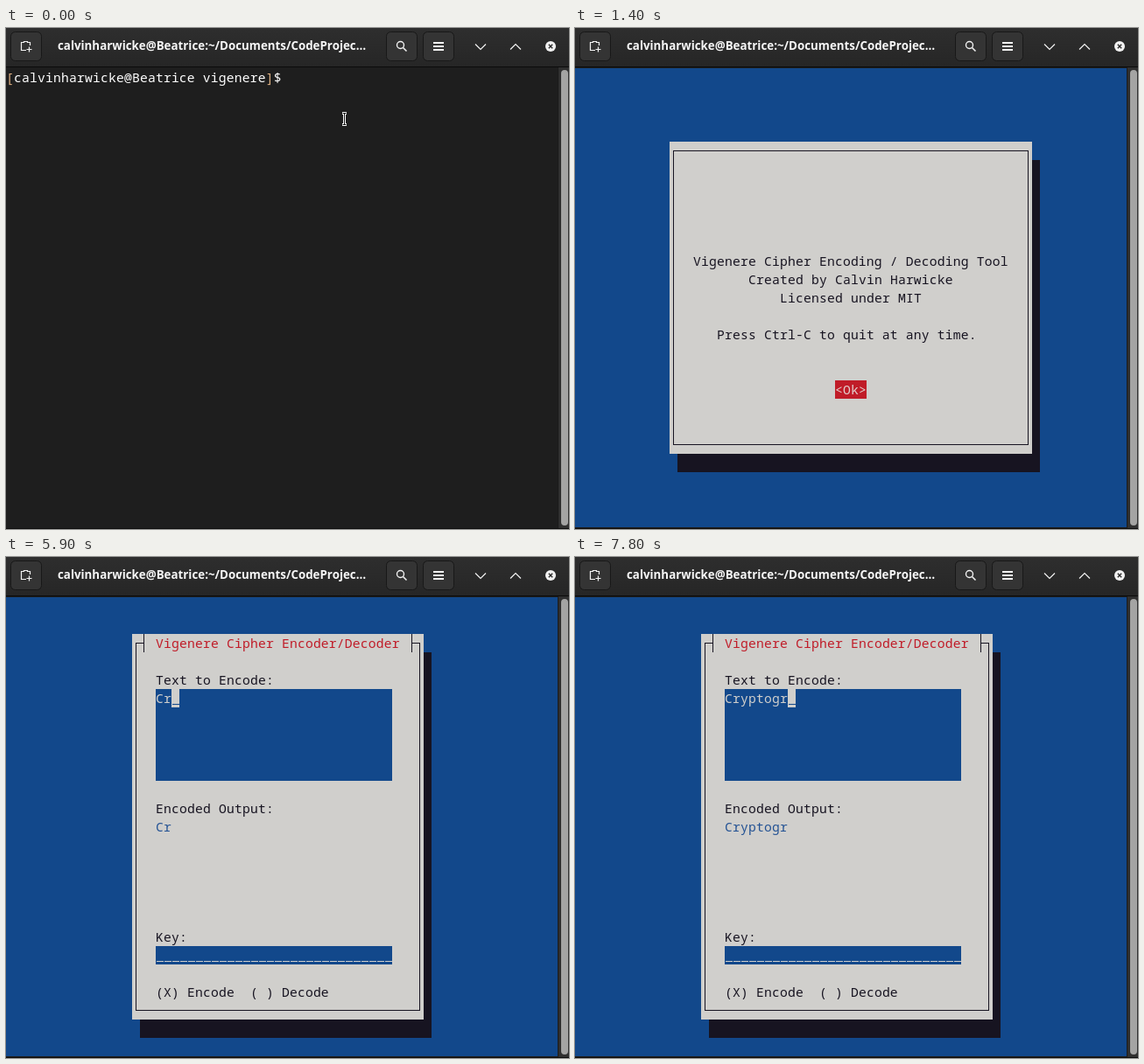
An HTML page for the animation above (8000 ms loop, 643 by 573 pixels).

```html
<!DOCTYPE html>
<html lang="en">
<head>
<meta charset="utf-8">
<title>Vigenere terminal</title>
<style>
  :root {
    --loop: 8s step-end infinite;
    --blue: #12488b;
    --gray: #d0cfcc;
    --ink: #171421;
    --red: #c01c28;
  }
  html, body { margin: 0; width: 100%; height: 100%; overflow: hidden; background: #1e1e1e; }
  .stage { position: relative; width: 643px; height: 573px; overflow: hidden; background: #1e1e1e; }
  .stage * { box-sizing: border-box; }

  .chrome { position: absolute; left: 0; top: 0; }
  .title {
    position: absolute; left: 59px; top: 10px; line-height: 21px; white-space: nowrap;
    font: bold 13.333px/21px "Noto Sans", sans-serif; color: #f6f6f6;
  }

  /* Terminal grid: cells of 9 x 21 pixels */
  .screen {
    position: absolute; left: 0; top: 46px; width: 630px; height: 525px; overflow: hidden;
    font: 14.667px/21px "Noto Sans Mono", monospace; letter-spacing: .2px; color: var(--ink);
  }
  .row, .box, .dialog, .scene { position: absolute; }
  .row, .box { left: calc(var(--c) * 9px); top: calc(var(--r) * 21px); }
  .row { height: 21px; white-space: pre; display: flex; }
  .box { width: calc(var(--w) * 9px); height: calc(var(--h) * 21px); background: var(--fill); }
  .frame { position: absolute; left: 4px; right: 4px; top: 10px; bottom: 10px; border: 1px solid var(--ink); }
  .panel { --fill: var(--gray); box-shadow: 9px 21px var(--ink); }

  .scene { inset: 0; background: var(--blue); }
  .shell { background: #1e1e1e; color: #fff; }
  .shell b { font-weight: normal; color: #dcae80; }
  .intro { animation: intro var(--loop); }
  .tool { animation: tool var(--loop); }
  @keyframes intro { 0% { opacity: 0 } 17.5% { opacity: 1 } 30%, 100% { opacity: 0 } }
  @keyframes tool { 0% { opacity: 0 } 30%, 100% { opacity: 1 } }

  .typed { display: block; overflow: hidden; height: 21px; }
  .cursor { position: relative; flex: none; width: 9px; height: 21px; }

  .command { animation: command var(--loop); }
  .shell .cursor { background: #fff; animation: wake var(--loop); }
  .pointer { position: absolute; left: 380px; top: 46px; animation: hide var(--loop); }
  @keyframes command { 0% { width: 0 } 5% { width: 9px } 11.25%, 100% { width: 81px } }
  @keyframes wake { 0% { opacity: 0 } 3.75%, 100% { opacity: 1 } }
  @keyframes hide { 0% { opacity: 1 } 3.75%, 100% { opacity: 0 } }

  .message { animation: message var(--loop); }
  .input { color: var(--gray); }
  .output { color: #245394; }
  .input .cursor { animation: caret var(--loop); }
  .input .cursor::after {
    content: ""; position: absolute; left: 1px; top: 17px; width: 8px; height: 1px; background: var(--blue);
  }
  @keyframes message {
    0% { width: 0 }
    68.75% { width: 9px }
    73.75% { width: 18px }
    78.75% { width: 27px }
    85% { width: 36px }
    87.5% { width: 45px }
    88.75% { width: 54px }
    96.25% { width: 63px }
    97.5%, 100% { width: 72px }
  }
  @keyframes caret {
    0% { background: linear-gradient(var(--blue) 16px, #b4d3ee 16px) }
    68.75%, 100% { background: var(--gray) }
  }

  .tool .frame { border-top: 0; }
  .tab { position: absolute; top: 0; width: 10px; height: 21px; }
  .tab::before { content: ""; position: absolute; top: 10px; width: 100%; height: 1px; background: var(--ink); }
  .tab.left { left: 4px; border-right: 1px solid var(--ink); }
  .tab.right { right: 4px; border-left: 1px solid var(--ink); }
  .heading { color: var(--red); }
  .ok { background: var(--red); color: #e3cfcc; }
  .blanks {
    position: absolute; left: 0; top: 17px; width: 100%; height: 1px;
    background: repeating-linear-gradient(90deg, transparent 0 1px, var(--gray) 1px 9px);
  }
</style>
</head>
<body>
<div class="stage">
  <svg class="chrome" width="643" height="573" fill="none" stroke="#f2f2f2">
    <defs>
      <linearGradient id="bar" x2="0" y2="1">
        <stop stop-color="#2e2e2e"/><stop offset="1" stop-color="#262626"/>
      </linearGradient>
      <rect id="button" y="4.5" width="35" height="33" rx="5" fill="#343434" stroke="#181818"/>
    </defs>
    <g stroke="none">
      <rect width="643" height="44" fill="url(#bar)"/>
      <rect y="44" width="643" height="1" fill="#0b0b0b"/>
      <rect x="630" y="45" width="13" height="527" fill="#303030"/>
      <rect x="630" y="45" width="1" height="527" fill="#1b1b1b"/>
      <rect x="634" y="48" width="8" height="521" rx="4" fill="#a4a4a3"/>
      <rect y="572" width="643" height="1" fill="#0d0d0d"/>
    </g>
    <use href="#button" x="5.5"/>
    <use href="#button" x="434.5"/>
    <use href="#button" x="476.5"/>
    <path d="M23 25.5H17.5V16.5H20.5V15.5H24.5V16.5H27.5V20M26.5 21.5V27.5M23.5 24.5H29.5" stroke-width="1.2"/>
    <circle cx="450.5" cy="19.5" r="4" stroke-width="1.4"/>
    <path d="M453.5 22.5L457.5 26.5" stroke-width="1.6"/>
    <path d="M488 17H500M488 21H500M488 25H500" stroke-width="2"/>
    <path d="M536 18.5L542 24.5L548 18.5M576 24.5L582 18.5L588 24.5" stroke-width="1.2"/>
    <circle cx="622" cy="21" r="6" fill="#f2f2f2" stroke="none"/>
    <path d="M619.8 18.8L624.2 23.2M624.2 18.8L619.8 23.2" stroke="#292929" stroke-width="1.4"/>
  </svg>
  <div class="title">calvinharwicke@Beatrice:~/Documents/CodeProjec…</div>

  <div class="screen">
    <div class="scene shell">
      <div class="row" style="--c:0;--r:0"><span><b>[</b>calvinharwicke@Beatrice vigenere<b>]</b>$ </span><span class="typed command">cargo run</span><i class="cursor"></i></div>
      <svg class="pointer" width="13" height="22">
        <g id="beam" fill="none" stroke="#fff" stroke-width="3">
          <path d="M4 5.5H9M4 18.5H9M6.5 5.5V18.5"/>
          <path d="M4.5 5.5H8.5M4.5 18.5H8.5M6.5 5.5V18.5" stroke="#111" stroke-width="1"/>
        </g>
      </svg>
    </div>

    <div class="scene intro">
      <div class="box panel" style="--c:12;--r:4;--w:46;--h:17"><div class="frame"></div></div>
      <div class="row" style="--c:15;--r:10">Vigenere Cipher Encoding / Decoding Tool</div>
      <div class="row" style="--c:22;--r:11">Created by Calvin Harwicke</div>
      <div class="row" style="--c:26;--r:12">Licensed under MIT</div>
      <div class="row" style="--c:18;--r:14">Press Ctrl-C to quit at any time.</div>
      <div class="row ok" style="--c:33;--r:17">&lt;Ok&gt;</div>
    </div>

    <div class="scene tool">
      <div class="box panel" style="--c:16;--r:2;--w:37;--h:21">
        <div class="frame"></div>
        <div class="tab left"></div>
        <div class="tab right"></div>
      </div>
      <div class="row heading" style="--c:19;--r:2">Vigenere Cipher Encoder/Decoder</div>
      <div class="row" style="--c:19;--r:4">Text to Encode:</div>
      <div class="box" style="--c:19;--r:5;--w:30;--h:5;--fill:var(--blue)"></div>
      <div class="row input" style="--c:19;--r:5"><span class="typed message">Cryptogr</span><i class="cursor"></i></div>
      <div class="row" style="--c:19;--r:11">Encoded Output:</div>
      <div class="row output" style="--c:19;--r:12"><span class="typed message">Cryptogr</span></div>
      <div class="row" style="--c:19;--r:18">Key:</div>
      <div class="box" style="--c:19;--r:19;--w:30;--h:1;--fill:var(--blue)"><div class="blanks"></div></div>
      <div class="row" style="--c:19;--r:21">(X) Encode  ( ) Decode</div>
    </div>
  </div>
</div>
</body>
</html>
```
